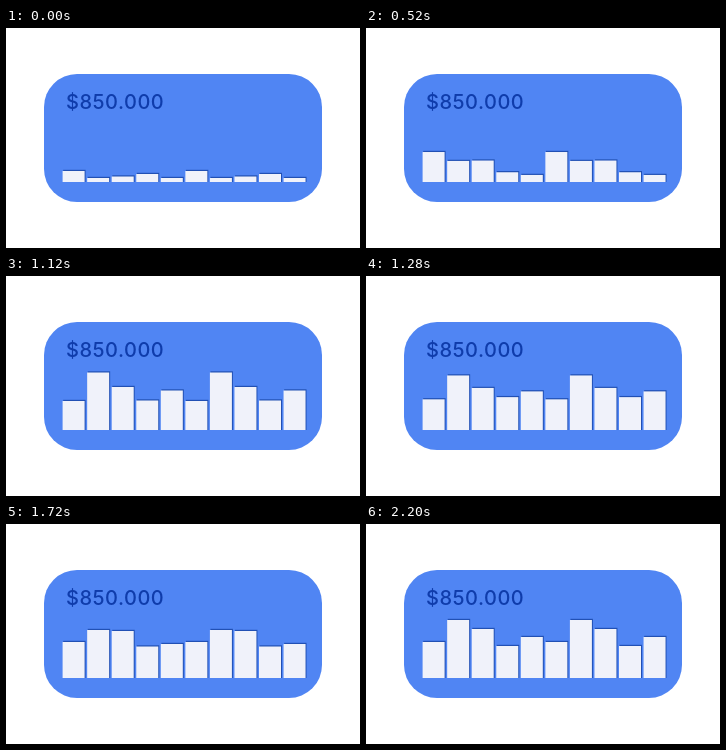
An HTML page for the animation above (2.24 s loop, 354x220 px).

```html
<!DOCTYPE html>
<html lang="en">
<head>
<meta charset="utf-8">
<title>Balance chart</title>
<style>
  html, body { margin: 0; width: 100%; height: 100%; overflow: hidden; background: #fff; }
  svg { display: block; width: 354px; height: 220px; }
  text { font: 500 20px Inter, "Open Sans", sans-serif; letter-spacing: .5px; fill: #0f3cab; }
</style>
</head>
<body>
<svg viewBox="0 0 354 220">
  <rect x="38" y="46" width="278" height="128" rx="33" fill="#5085f3"/>
  <text x="60" y="81">$850.000</text>
  <g id="bars"></g>
</svg>
<script>
const LOOP = 2240, STEP = 40, BASE = 154, PITCH = 24.55, WIDTH = 22;
const times = [0, 280, 800, 1120, 1480, 1720, 2200];
// One row per bar of the repeating group: height at each time.
const heights = [
  [11, 26, 32, 29, 34, 36, 36],
  [4, 10.5, 37, 57.5, 49.5, 48, 58],
  [5.5, 0, 48.5, 43, 41.5, 47, 49],
  [8, 6.5, 17.5, 29.5, 35, 31.5, 32],
  [4, 3.5, 16.5, 39.5, 36.5, 34, 41]
];

// Monotone cubic slopes: smooth, with no overshoot past the key poses.
function slopes(row) {
  const d = times.slice(1).map((t, i) => (row[i + 1] - row[i]) / (t - times[i]));
  return row.map((_, i) => {
    if (i === 0) return d[0];
    if (i === d.length) return d[i - 1];
    const a = d[i - 1], b = d[i];
    return a * b > 0 ? 2 * a * b / (a + b) : 0;
  });
}
const rates = heights.map(slopes);

function heightAt(bar, t) {
  const row = heights[bar], rate = rates[bar], last = times.length - 1;
  if (t >= times[last]) return row[last];
  let i = 0;
  while (t >= times[i + 1]) i++;
  const span = times[i + 1] - times[i], u = (t - times[i]) / span, v = 1 - u;
  return row[i] * (1 + 2 * u) * v * v + row[i + 1] * u * u * (3 - 2 * u)
    + span * u * v * (rate[i] * v - rate[i + 1] * u);
}

const group = document.getElementById('bars');
function addRect(x, width, fill, opacity) {
  const rect = document.createElementNS('http://www.w3.org/2000/svg', 'rect');
  const attrs = { x, width, fill, 'fill-opacity': opacity };
  for (const key in attrs) rect.setAttribute(key, attrs[key]);
  group.append(rect);
  return rect;
}
function place(rect, height, lift) {
  rect.setAttribute('y', BASE - height - lift);
  rect.setAttribute('height', height > .6 ? height + lift : 0);
}

const bars = Array.from({ length: 10 }, (_, i) => {
  const x = 56.6 + i * PITCH;
  return {
    shade: addRect(x + .6, WIDTH + .4, '#123f9f', .75),
    face: addRect(x, WIDTH, '#f0f2fa', 1)
  };
});

function draw(now) {
  const t = Math.floor(now % LOOP / STEP) * STEP;
  bars.forEach(({ shade, face }, i) => {
    const height = heightAt(i % 5, t);
    place(shade, height, 1.2);
    place(face, height, 0);
  });
}

const start = performance.now();
function tick() {
  draw(performance.now() - start);
  requestAnimationFrame(tick);
}
tick();
</script>
</body>
</html>
```
